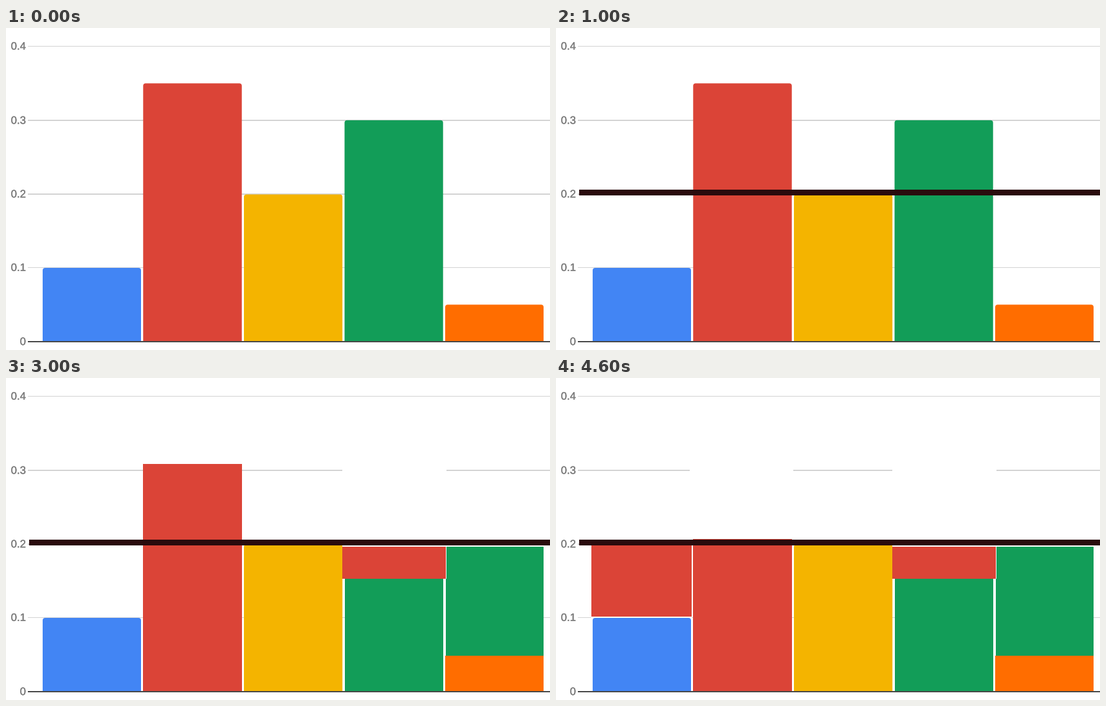
Recreate the animation shown at these times as a matplotlib script. Size 846 by 502 pixels, loop 5 s.

```python
import matplotlib.pyplot as plt
from matplotlib.animation import FuncAnimation
from matplotlib.patches import PathPatch, Rectangle
from matplotlib.patheffects import withStroke
from matplotlib.path import Path

W, H, DPI = 846, 502, 64
PT = 72 / DPI  # points per pixel
STEPS = 5
BASE = 489

BLUE, RED, YELLOW = "#4285f4", "#db4437", "#f4b400"
GREEN, ORANGE = "#129d58", "#ff6d00"
GRID, AXIS, LABEL, MEAN = "#d3d3d3", "#484848", "#808080", "#2a0b0d"

plt.rcParams["toolbar"] = "None"
fig = plt.figure(figsize=(W / DPI, H / DPI), dpi=DPI, facecolor="white")
ax = fig.add_axes([0, 0, 1, 1])
ax.set(xlim=(0, W), ylim=(H, 0))
ax.axis("off")

layers = []  # (artist, first step, last step)


def add(patch, z, first, last):
    patch.set(zorder=z, linewidth=0)
    layers.append((ax.add_patch(patch), first, last))


def box(x0, y0, x1, y1, color, z=3, first=0, last=STEPS - 1):
    add(Rectangle((x0, y0), x1 - x0, y1 - y0, facecolor=color), z, first, last)


def bar(x0, x1, top, color, first=0, last=STEPS - 1, r=4):
    """Column with rounded top corners."""
    pts = [(x0, BASE), (x0, top + r), (x0, top), (x0 + r, top),
           (x1 - r, top), (x1, top), (x1, top + r), (x1, BASE), (x0, BASE)]
    codes = [Path.MOVETO, Path.LINETO, Path.CURVE3, Path.CURVE3, Path.LINETO,
             Path.CURVE3, Path.CURVE3, Path.LINETO, Path.CLOSEPOLY]
    add(PathPatch(Path(pts, codes), facecolor=color), 3, first, last)


# Grid and labels
for text, y in zip(("0.4", "0.3", "0.2", "0.1", "0"),
                   (28.5, 144.2, 259, 373.6, BASE)):
    if y < BASE:
        box(34, y - 0.8, W, y + 0.8, GRID, z=1)
    ax.text(31, y + 5.2, text, ha="right", va="baseline", color=LABEL,
            family="Liberation Sans", fontsize=16.8 * PT,
            path_effects=[withStroke(linewidth=0.4 * PT, foreground=LABEL)])
box(34, BASE - 0.8, W, BASE + 0.8, AXIS, z=6)

# Columns that start the story
bar(57, 210, 374, BLUE)
bar(213.3, 366.7, 86.3, RED, last=2)
bar(370, 523.2, 259.5, YELLOW)
bar(526.5, 679.7, 143.8, GREEN, last=1)
bar(683, 836, 431.3, ORANGE, last=1)

# Average line
box(35.5, 252, W, 261, MEAN, z=5, first=1)

# Green fills up orange
box(523, 140, 685, 313, "white", z=2, first=2)
box(680, 261, 836, BASE, "white", z=2, first=2)
box(526.5, 313.3, 679.7, BASE, GREEN, first=2)
box(685.2, 263.3, 835.5, 433, GREEN, first=2)
box(684, 313.3, 686, 433, GREEN, first=2)
box(683, 432.7, 836, BASE, ORANGE, first=2)

# Red fills up green
box(213.3, 134.2, 366.7, BASE, RED, first=3, last=3)
box(523, 263.3, 684.3, 313.3, RED, first=3)

# Red fills up blue
box(208, 140, 369, 250, "white", z=2, first=4)
box(213.3, 250.5, 366.7, BASE, RED, first=4)
box(55, 370, 211, 376, "white", z=2, first=4)
box(55, 259.5, 210.7, 372, RED, first=4)


def update(step):
    for artist, first, last in layers:
        artist.set_visible(first <= step <= last)
    return [artist for artist, _, _ in layers]


anim = FuncAnimation(fig, update, frames=STEPS, interval=1000,
                     repeat=True, repeat_delay=0, blit=False)
plt.show()
```
